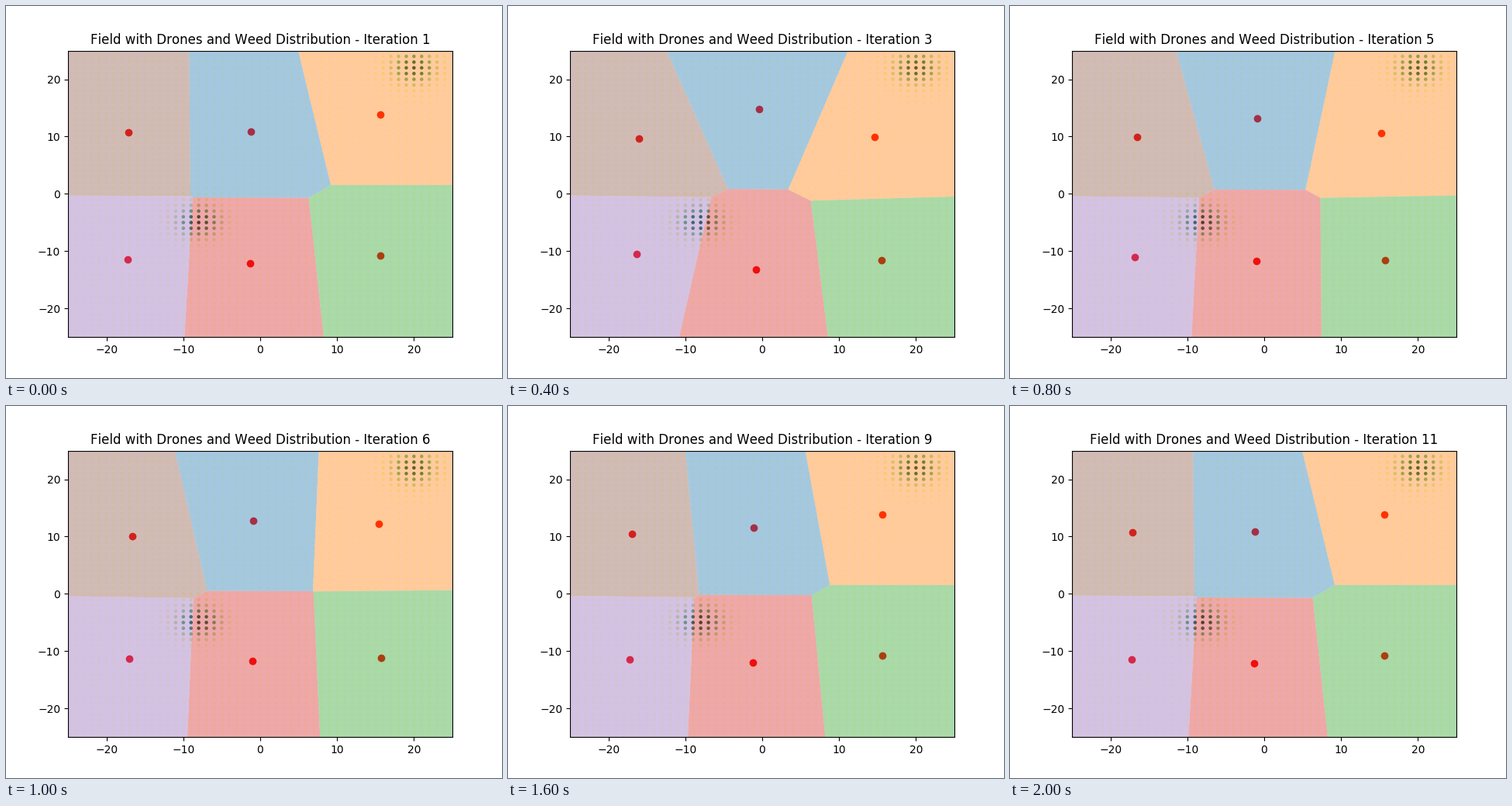
Recreate the animation shown at these times as a matplotlib script. Size 640 px wide and 480 px high, loop 2.2 s.

```python
import numpy as np
import matplotlib.pyplot as plt
from matplotlib.animation import FuncAnimation

HALF = 25
FRAMES, INTERVAL = 11, 200
SQUARE = [(-HALF, -HALF), (HALF, -HALF), (HALF, HALF), (-HALF, HALF)]
TURN = 4  # frame at which the drones pass their middle point

# Start, middle point, resting place, ease power, frames needed to settle.
DRONES = [
    ((-0.2, 15.6), (-0.9, 13.15), (-1.2, 10.85), 1, 6),
    ((14.0, 9.1), (15.2, 10.6), (15.65, 13.9), 2, 2),
    ((15.2, -11.7), (15.75, -11.6), (15.65, -10.8), 2, 2),
    ((-0.5, -15.0), (-1.0, -11.7), (-1.3, -12.15), 2, 6),
    ((-15.8, -9.85), (-16.8, -11.05), (-17.25, -11.45), 2, 2),
    ((-15.4, 9.25), (-16.5, 9.95), (-17.1, 10.74), 2, 6),
]


def position(drone, frame):
    """Ease out to the middle point, then glide evenly to rest."""
    start, middle, rest = map(np.array, drone[:3])
    power, settle = drone[3:]
    if frame <= TURN:
        left = 1 - (frame - 1) / (TURN - 1)
        return middle + (start - middle) * left ** power
    return middle + (rest - middle) * min(1, (frame - TURN) / settle)


def layout(frame):
    """All drone positions; the loop opens on the settled layout."""
    return np.array([position(d, frame or FRAMES - 1) for d in DRONES])


def clip_closer(poly, site, other):
    """Keep the part of poly that is nearer to site than to other."""
    normal = other - site
    limit = normal @ (site + other) / 2
    kept = []
    for a, b in zip(poly, poly[1:] + poly[:1]):
        da, db = limit - normal @ a, limit - normal @ b
        if da >= 0:
            kept.append(a)
        if da * db < 0:
            kept.append(a + (b - a) * da / (da - db))
    return kept


def voronoi_cell(sites, i):
    poly = [np.array(corner, float) for corner in SQUARE]
    for j, other in enumerate(sites):
        if j != i:
            poly = clip_closer(poly, sites[i], other)
    return np.array(poly)


def weed_density(x, y):
    def patch(cx, cy, spread=2):
        return np.exp(-((x - cx) ** 2 + (y - cy) ** 2) / (2 * spread ** 2))
    return patch(20, 22) + patch(-8, -4.8)


plt.rcParams["text.kerning_factor"] = 6  # whole-pixel letter spacing
fig, ax = plt.subplots(figsize=(6.4, 4.8), dpi=100)
ax.set_xlim(-HALF, HALF)
ax.set_ylim(-HALF, HALF)
ax.set_xticks(range(-20, 21, 10))
ax.set_yticks(range(-20, 21, 10))
title = ax.set_title("")

gx, gy = np.meshgrid(np.arange(-HALF, HALF), np.arange(-HALF, HALF))
ax.scatter(gx, gy, s=5, c=weed_density(gx, gy), cmap="YlGn",
           vmin=0, vmax=1, zorder=1)
sites = layout(0)
markers = ax.scatter(*sites.T, c="red", zorder=1.1)
cells = [ax.fill(*voronoi_cell(sites, i).T, color=f"C{i}", alpha=0.4,
                 linewidth=0, zorder=1.2)[0] for i in range(len(sites))]


def update(frame):
    sites = layout(frame)
    markers.set_offsets(sites)
    for i, cell in enumerate(cells):
        cell.set_xy(voronoi_cell(sites, i))
    title.set_text("Field with Drones and Weed Distribution"
                   f" - Iteration {frame + 1}")
    return [markers, title, *cells]


anim = FuncAnimation(fig, update, frames=FRAMES, interval=INTERVAL,
                     repeat=True, repeat_delay=0, blit=False)
plt.show()
```
